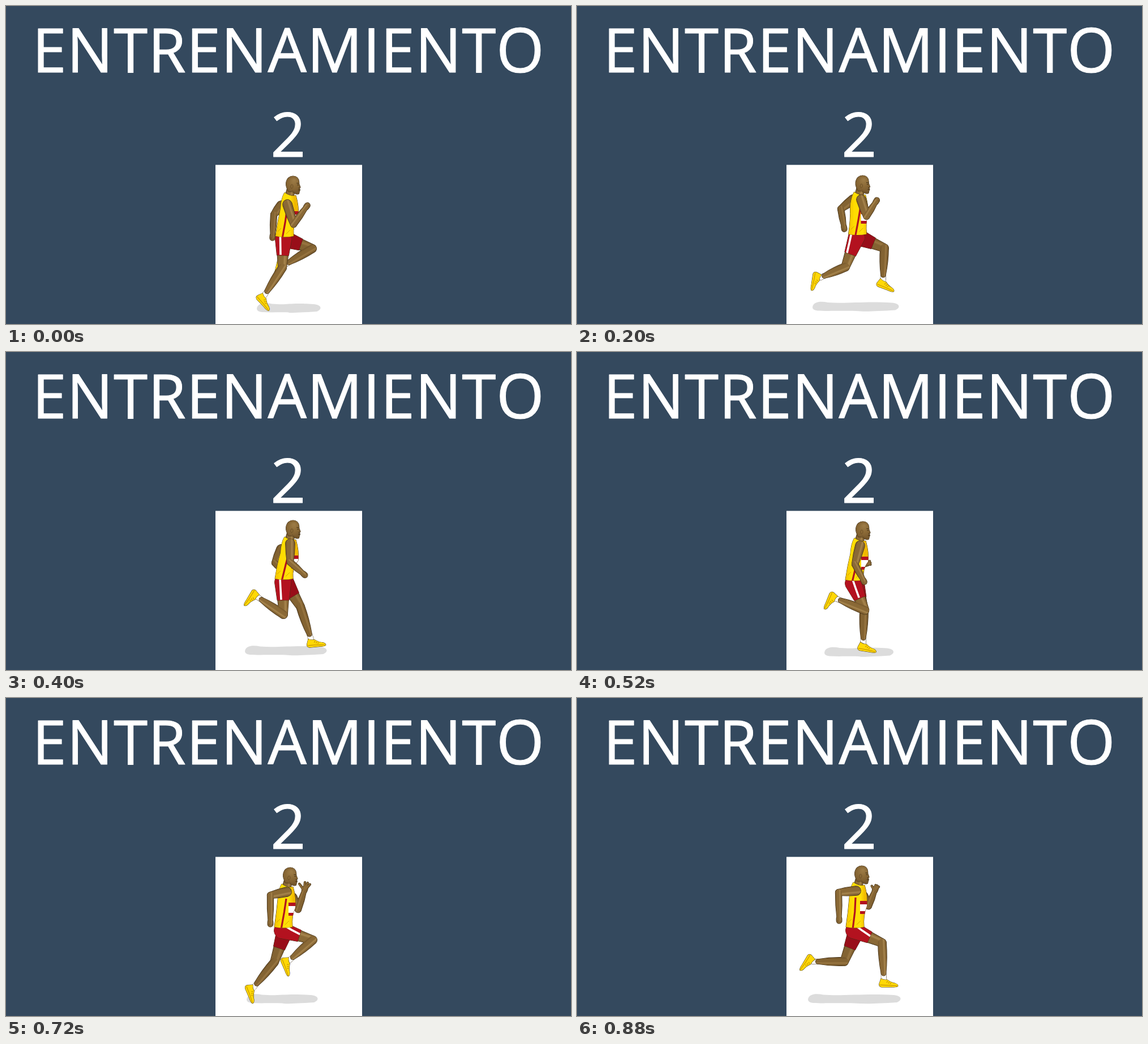
An HTML page with a canvas for the animation above (1000 ms loop, 998 by 561 pixels).

```html
<!DOCTYPE html>
<html lang="es">
<head>
<meta charset="utf-8">
<title>Entrenamiento 2</title>
<style>
  html, body { margin: 0; width: 100%; height: 100%; overflow: hidden; background: #34495e; }
  canvas, svg { position: absolute; left: 0; top: 0; width: 998px; height: 561px; }
  text {
    font: 108px "Open Sans", "Noto Sans", sans-serif; font-kerning: none; letter-spacing: 1.1px;
    text-anchor: middle; fill: #fff; stroke: #fff; stroke-width: 1.2; stroke-linejoin: round;
  }
</style>
</head>
<body>
<canvas id="stage" width="998" height="561"></canvas>
<svg viewBox="0 0 998 561">
  <text x="499" y="116.5">ENTRENAMIENTO</text>
  <text x="499" y="265.5">2</text>
</svg>
<script>
const ctx = document.getElementById('stage').getContext('2d');
const INK = '#3d2c13', RED = '#b3121f', DARK_RED = '#980e19';
const NEAR = { dark: '#6e5128', base: '#8a6936', light: '#a8864e' };
const FAR = { dark: '#664a24', base: '#836332', light: '#9a7742' };

// arm: shoulder, elbow, hand.  leg: knee, ankle, foot angle in degrees.
// shadow: left, right, middle height.  fingers: length on the far hand.
const push = {
  head: [507, 316], waist: [492, 404], shadow: [443, 556, 533], fingers: 0,
  armN: [497, 350, 508, 385, 530, 355], armF: [486, 352, 473, 368, 471, 405],
  legN: [488, 462, 456, 511, 48], legF: [541, 428, 492, 457, 105]
};
const leap = {
  head: [504, 317], waist: [497, 403], shadow: [419, 559, 533], fingers: 0,
  armN: [500, 345, 516, 374, 522, 340], armF: [488, 341, 465, 353, 466, 386],
  legN: [468, 459, 427, 503, 90], legF: [547, 416, 528, 471, 47]
};
const reach = {
  head: [505, 313], waist: [494, 398], shadow: [413, 579, 528], fingers: 0,
  armN: [504, 338, 507, 368, 533, 352], armF: [488, 341, 467, 363, 477, 393],
  legN: [480, 462, 433, 455, 110], legF: [539, 438, 553, 496, -4]
};
const land = {
  head: [507, 313], waist: [491, 398], shadow: [422, 567, 527], fingers: 0,
  armN: [502, 338, 502, 371, 525, 391], armF: [486, 348, 475, 372, 484, 382],
  legN: [490, 463, 444, 432, 122], legF: [520, 449, 539, 507, -4]
};
const stance = {
  head: [503, 317], waist: [489, 402], shadow: [452, 552, 532], fingers: 13,
  armN: [498, 345, 480, 378, 486, 413], armF: [504, 366, 510, 387, 534, 366],
  legN: [527, 448, 471, 438, 105], legF: [494, 462, 472, 520, 24]
};
const drive = {
  head: [502, 315], waist: [490, 402], shadow: [425, 551, 531], fingers: 12,
  armN: [496, 342, 467, 348, 467, 395], armF: [506, 352, 516, 373, 527, 340],
  legN: [542, 427, 500, 463, 68], legF: [474, 466, 437, 511, 68]
};
const fly = {
  head: [503, 312], waist: [491, 402], shadow: [408, 572, 531], fingers: 7,
  armN: [493, 340, 462, 343, 463, 389], armF: [506, 350, 515, 367, 526, 340],
  legN: [539, 432, 542, 496, 1], legF: [472, 465, 417, 465, 122]
};

function mix(a, b) {
  if (typeof a === 'number') return (a + b) / 2;
  if (Array.isArray(a)) return a.map((v, i) => mix(v, b[i]));
  return Object.fromEntries(Object.keys(a).map(k => [k, mix(a[k], b[k])]));
}

const steps = [
  [0, push], [120, leap], [200, mix(leap, reach)], [320, reach], [400, land],
  [520, mix(land, stance)], [600, stance], [720, drive], [800, mix(drive, fly)], [880, fly]
];

const toward = (a, b, t) => [a[0] + (b[0] - a[0]) * t, a[1] + (b[1] - a[1]) * t];
const add = (p, x, y) => [p[0] + x, p[1] + y];
const heading = (a, b) => Math.atan2(b[1] - a[1], b[0] - a[0]);

function taper(a, b, ra, rb, bulge = 0, flat = false) {
  const q = Math.PI / 2, ang = heading(a, b), path = new Path2D();
  const nx = Math.sin(ang), ny = -Math.cos(ang), m = toward(a, b, .5);
  const r = (ra + rb) / 2 + bulge * 2;
  path.moveTo(b[0] + nx * rb, b[1] + ny * rb);
  if (flat) path.lineTo(b[0] - nx * rb, b[1] - ny * rb);
  else path.arc(b[0], b[1], rb, ang - q, ang + q);
  path.quadraticCurveTo(m[0] - nx * r, m[1] - ny * r, a[0] - nx * ra, a[1] - ny * ra);
  path.arc(a[0], a[1], ra, ang + q, ang + 3 * q);
  path.quadraticCurveTo(m[0] + nx * r, m[1] + ny * r, b[0] + nx * rb, b[1] + ny * rb);
  return path;
}

function skinFill(a, b, r, tone) {
  const ang = heading(a, b), nx = -Math.sin(ang) * r, ny = Math.cos(ang) * r;
  const g = ctx.createLinearGradient(a[0] + nx, a[1] + ny, a[0] - nx, a[1] - ny);
  [tone.dark, tone.base, tone.base, tone.light, tone.base, tone.dark]
    .forEach((c, i) => g.addColorStop([0, .24, .52, .66, .8, 1][i], c));
  return g;
}

function outline(path, fill, width = 1) {
  ctx.lineWidth = width * 2;
  ctx.strokeStyle = INK;
  ctx.stroke(path);
  ctx.fillStyle = fill;
  ctx.fill(path);
}

// Outline every part first so that joints show no seam.
function flesh(parts, tone) {
  const paths = parts.map(p => taper(...p));
  ctx.lineWidth = 1.3;
  ctx.strokeStyle = INK;
  paths.forEach(p => ctx.stroke(p));
  paths.forEach((p, i) => {
    const [a, b, ra, rb] = parts[i];
    ctx.fillStyle = skinFill(a, b, Math.max(ra, rb) + 1, tone);
    ctx.fill(p);
  });
}

function line(points, color, width) {
  ctx.beginPath();
  points.forEach(p => ctx.lineTo(...p));
  ctx.strokeStyle = color;
  ctx.lineWidth = width;
  ctx.stroke();
}

function arm([sx, sy, ex, ey, hx, hy], tone, fingers) {
  const s = [sx, sy], e = [ex, ey], h = [hx, hy], ang = heading(e, h);
  const polar = (d, turn) => add(h, Math.cos(ang + turn) * d, Math.sin(ang + turn) * d);
  const parts = [[s, e, 8.2, 5.5, .6], [e, h, 5.5, 3.8, .8], [h, polar(4, 0), 4.7, 4.8]];
  if (fingers > 3) {
    [-.95, -.25, .08, .4].forEach(turn => parts.push([h, polar(fingers + 3, turn), 2, 1.5]));
  }
  flesh(parts, tone);
  if (fingers <= 3) {
    line([polar(5, -.7), polar(8, -.1)], tone.dark, 1);
    line([polar(4, .7), polar(7, .3)], tone.dark, 1);
  }
}

function shoe(ankle, degrees) {
  ctx.save();
  ctx.translate(...ankle);
  ctx.rotate(degrees * Math.PI / 180);
  outline(new Path2D('M-5 -1Q0 2 6 1Q13 6 20 7Q26 9 25 12Q23 14 14 13.5L-4 14Q-9 13 -8 8Z'), '#ffd806', .5);
  ctx.strokeStyle = '#c79700';
  ctx.lineWidth = 1.2;
  ctx.stroke(new Path2D('M-7 10.5Q8 10 24 11.5M7 3L5 6M10 4.5L8 7.5M13 6L11 8.5'));
  ctx.restore();
}

function leg(hip, [kx, ky, ax, ay, turn], tone) {
  const knee = [kx, ky], ankle = [ax, ay], cuff = toward(knee, ankle, .84);
  outline(taper(toward(knee, ankle, .8), ankle, 4.2, 4.6), '#fff', .5);
  flesh([[hip, knee, 11, 7.2, .8], [knee, cuff, 7.2, 4.2, 1.2]], tone);
  shoe(ankle, turn);
}

function shortsLeg(hip, knee, fill) {
  const path = taper(hip, toward(hip, knee, .56), 14.5, 10.4, 0, true);
  outline(path, fill, .5);
  return path;
}

function shadow([l, r, y]) {
  ctx.beginPath();
  ctx.moveTo(l, y + 1);
  ctx.bezierCurveTo(l + 1, y - 9, l + 14, y - 10, l + 27, y - 7.5);
  ctx.bezierCurveTo(l + 60, y - 5, r - 60, y - 10, r - 13, y - 7);
  ctx.bezierCurveTo(r + 2, y - 6, r + 3, y + 2, r - 7, y + 6);
  ctx.bezierCurveTo(r - 40, y + 8, r - 60, y + 9, (l + r) / 2, y + 7.5);
  ctx.bezierCurveTo(l + 40, y + 7, l + 25, y + 8, l + 9, y + 7);
  ctx.quadraticCurveTo(l, y + 6, l, y + 1);
  ctx.fillStyle = '#dcdcdc';
  ctx.fill();
}

function head(c) {
  ctx.save();
  ctx.translate(...c);
  const skull = new Path2D('M-8 11Q-13 3 -12.3 -4C-11 -13 -5 -16 0 -16C6 -16 10 -12 10.6 -6L10.8 -2L13 4L11.3 5.5L12.3 8.5L11.3 11L10.5 15Q6 17.5 0 12Z');
  const g = ctx.createRadialGradient(2, -9, 1, 0, 0, 19);
  g.addColorStop(0, '#9c7b46');
  g.addColorStop(.45, NEAR.base);
  g.addColorStop(1, '#70522a');
  outline(skull, g, .6);
  ctx.lineWidth = 1;
  ctx.strokeStyle = INK;
  ctx.stroke(new Path2D('M6.5 -3.5L10.5 -3M7.5 -.5L10 -.2M9 8.5L12 8.3M9.8 5L11.5 5.5'));
  ctx.strokeStyle = NEAR.dark;
  ctx.stroke(new Path2D('M-2 9Q2 13 8 14M-3 -1Q-6 3 -3 6Q0 6 0 1Q-1 -2 -3 -1'));
  ctx.restore();
}

function jersey(n, w, shoulder) {
  const p = new Path2D(), at = add;
  p.moveTo(...at(n, -8, -8));
  p.quadraticCurveTo(...at(n, -14, 2), ...at(n, -15, 20));
  p.quadraticCurveTo(...at(w, -12, -24), ...at(w, -16, 2));
  p.quadraticCurveTo(...at(w, 0, 5), ...at(w, 16, 2));
  p.quadraticCurveTo(...at(w, 14, -18), ...at(n, 16, 34));
  p.quadraticCurveTo(...at(n, 18, 18), ...at(n, 12, -3));
  p.quadraticCurveTo(...at(n, 3, 0), ...at(n, -8, -8));
  const g = ctx.createLinearGradient(w[0] - 16, 0, w[0] + 18, 0);
  g.addColorStop(0, '#f2c000');
  g.addColorStop(.3, '#ffdc00');
  g.addColorStop(.75, '#ffe008');
  g.addColorStop(1, '#f0b800');
  outline(p, g, .5);
  ctx.save();
  ctx.clip(p);
  ctx.fillStyle = RED;
  ctx.fillRect(n[0] + 4, n[1] + 25, 16, 23);
  ctx.fillStyle = '#fff';
  ctx.fillRect(n[0] + 4, n[1] + 31, 16, 12);
  line([add(shoulder, -1, 12), add(toward(shoulder, w, .6), -1, 0), add(w, -4, 6)], RED, 3.2);
  line([add(w, -12, -6), add(w, -6, -12)], '#dca200', 1);
  line([add(w, 3, -2), add(w, 10, -9)], '#dca200', 1);
  ctx.restore();
}

function runner(p) {
  const neck = add(p.head, -7, 21), hipN = add(p.waist, -2, 8), hipF = add(p.waist, 3, 8);
  const kneeN = p.legN.slice(0, 2), kneeF = p.legF.slice(0, 2);
  shadow(p.shadow);
  arm(p.armF, FAR, p.fingers);
  leg(hipF, p.legF, FAR);
  shortsLeg(hipF, kneeF, DARK_RED);
  leg(hipN, p.legN, NEAR);
  const cloth = shortsLeg(hipN, kneeN, RED);
  ctx.save();
  ctx.clip(cloth);
  const lean = Math.max(-11, Math.min(-1, -7 + (kneeN[0] - p.waist[0]) * .15));
  const hem = toward(hipN, kneeN, .6);
  line([add(p.waist, lean, -2), add(toward(p.waist, hem, .5), lean * .75, -2), add(hem, lean * .5, -3)], '#fff', 3.6);
  ctx.restore();
  flesh([[add(p.head, -3, 6), neck, 7, 7.5]], NEAR);
  jersey(neck, p.waist, p.armN.slice(0, 2));
  head(p.head);
  arm(p.armN, NEAR, 0);
}

function draw(now) {
  const t = now % 1000;
  ctx.fillStyle = '#34495e';
  ctx.fillRect(0, 0, 998, 561);
  ctx.fillStyle = '#fff';
  ctx.fillRect(370, 280.3, 259, 281);
  ctx.lineJoin = 'round';
  runner(steps.filter(s => s[0] <= t).pop()[1]);
}

function tick() {
  draw(performance.now());
  requestAnimationFrame(tick);
}
tick();
</script>
</body>
</html>
```
